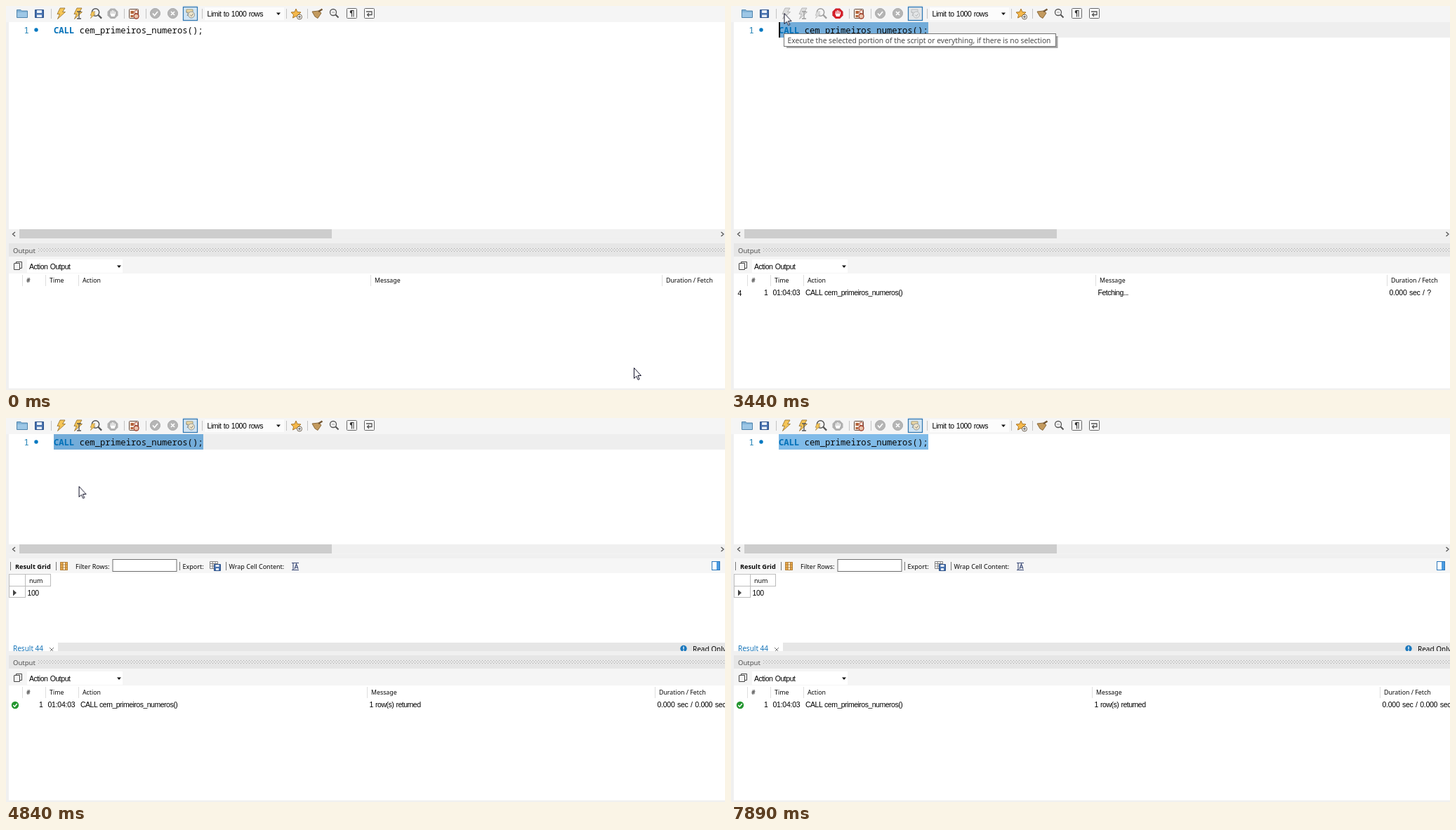
An HTML page that plays this animation: 1024 by 547 pixels, repeating every 8060 ms.

```html
<!DOCTYPE html>
<html lang="pt">
<head>
<meta charset="utf-8">
<title>SQL editor</title>
<style>
html, body { margin: 0; width: 100%; height: 100%; overflow: hidden; background: #fff; }
svg { display: block; width: 100vw; height: 100vh; }
text { font: 9px "Noto Sans", sans-serif; fill: #080808; white-space: pre; }
.code { font: 500 12.22px "Noto Sans Mono", monospace; }
.key { font-weight: 700; fill: #0070b8; }
.head { font-size: 8.8px; }
.ui { font: 10.5px "Liberation Sans", sans-serif; letter-spacing: -.45px; word-spacing: .8px; fill: #000; }
.row { letter-spacing: -.5px; }
.wide { letter-spacing: -.25px; }
.line { fill: none; stroke: #555; stroke-width: 1.3; }
.sep { stroke: #c3c3c3; }
.hot { fill: #c5e2f6; stroke: #3d8fce; }

/* 1% = 80.6 ms */
.anim { animation: 8.06s step-end infinite; }
#mouse { animation: mouse 8.06s ease-in-out infinite; }
#focus { animation-name: focus; }
#caret { animation-name: caret; }
#select { animation-name: select; }
#tip { animation-name: tip; }
#hot1 { animation-name: hot1; }
#hot2 { animation-name: hot2; }
.idle { animation-name: idle; }
.busy { animation-name: busy; }
.panel { animation-name: panel; }
.entry { animation-name: entry; }
.wait { animation-name: wait; }
.done { animation-name: done; }
#messageCol { animation-name: messageCol; }
#timeCol { animation-name: timeCol; }

@keyframes mouse {
  0%, .6% { transform: translate(894px, 515px); }
  10.546%, 11.3% { transform: translate(102px, 9px); }
  14.516%, 55.6% { transform: translate(75.5px, 10px); }
  65.012% { transform: translate(137px, 201px); }
  68.2% { transform: translate(138px, 241px); }
  69.851%, 71.2% { transform: translate(133px, 235px); }
  75.558%, 77.6% { transform: translate(84px, 234px); animation-timing-function: ease-in; }
  81.266% { transform: translate(380px, 200px); animation-timing-function: ease-out; }
  86.352%, 87.8% { transform: translate(922px, 490px); }
  93.176%, 100% { transform: translate(963px, 550px); }
}
@keyframes focus { 0% { opacity: 0; } 16.377% { opacity: 1; } 97.891%, 100% { opacity: 0; } }
@keyframes caret {
  0% { opacity: 0; transform: none; }
  16.377% { opacity: 1; transform: none; }
  23.077% { opacity: 0; transform: none; }
  28.908% { opacity: 1; transform: none; }
  34.739% { opacity: 0; transform: none; }
  35.856% { opacity: 1; transform: translateX(-212px); }
  49.256% { opacity: 1; transform: none; }
  55.831% { opacity: 0; transform: none; }
  62.407% { opacity: 1; transform: none; }
  68.983% { opacity: 0; transform: none; }
  75.558% { opacity: 1; transform: none; }
  82.134% { opacity: 0; transform: none; }
  88.586% { opacity: 1; transform: none; }
  95.037%, 100% { opacity: 0; transform: none; }
}
@keyframes select {
  0% { opacity: 0; fill: #73acd9; }
  35.856% { opacity: 1; fill: #73acd9; }
  97.891%, 100% { opacity: 1; fill: #80bbe8; }
}
@keyframes tip {
  0% { opacity: 0; } 18.61% { opacity: .35; } 19.417% { opacity: .7; }
  20.223% { opacity: 1; } 58.313%, 100% { opacity: 0; }
}
@keyframes hot1 {
  0% { opacity: 0; fill: #c5e2f6; }
  12.531% { opacity: 1; fill: #c5e2f6; }
  38.71% { opacity: 1; fill: #9bcdf0; }
  41.563% { opacity: 0; fill: #c5e2f6; }
  48.511% { opacity: 1; fill: #c5e2f6; }
  57.32%, 100% { opacity: 0; fill: #c5e2f6; }
}
@keyframes hot2 { 0% { opacity: 0; } 10.546% { opacity: 1; } 12.531%, 100% { opacity: 0; } }
@keyframes idle {
  0% { filter: none; } 41.563% { filter: grayscale(1) opacity(.55); } 48.511%, 100% { filter: none; }
}
@keyframes busy { 0% { opacity: 0; } 41.563% { opacity: 1; } 48.511%, 100% { opacity: 0; } }
@keyframes panel { 0% { opacity: 0; } 47.519%, 100% { opacity: 1; } }
@keyframes entry { 0% { opacity: 0; } 41.563%, 100% { opacity: 1; } }
@keyframes wait { 0% { opacity: 0; } 41.563% { opacity: 1; } 56.328%, 100% { opacity: 0; } }
@keyframes done { 0% { opacity: 0; } 56.328%, 100% { opacity: 1; } }
@keyframes messageCol { 0% { transform: none; } 56.328%, 100% { transform: translateX(-5px); } }
@keyframes timeCol { 0% { transform: none; } 56.328%, 100% { transform: translateX(-10px); } }
</style>
</head>
<body>
<svg viewBox="0 0 1024 547" preserveAspectRatio="none">
  <defs>
    <pattern id="dots" width="4" height="4" x="46" y="345" patternUnits="userSpaceOnUse">
      <path d="M0 0h1v1H0zM2 2h1v1H2z" fill="#a6a6a6"/>
    </pattern>
    <path id="bolt" d="M5 0H12L8.500 5.500H12.500L1.500 15.500 4.500 8.500H1Z" fill="#f6c657" stroke="#9b7734" stroke-width=".9"/>
    <path id="drop" d="M-3-1.500H3L0 2Z" fill="#111"/>
    <g id="lens" fill="none">
      <circle r="4.500" fill="#f4f4f4" stroke="#555" stroke-width="1.300"/>
      <path d="M3.300 3.300 7.500 7.500" stroke="#555" stroke-width="2"/>
    </g>
    <g id="scroll">
      <path d="M4 318H1024V331.500H4Z" fill="#f0f0f0"/>
      <path d="M19 318H464V331H19Z" fill="#cdcdcd"/>
      <path d="M13 322 9.500 325 13 328M1018.500 322 1022 325 1018.500 328" class="line"/>
    </g>
    <clipPath id="panelClip"><path d="M4 180H1024V332H4Z"/></clipPath>
  </defs>

  <!-- window -->
  <path d="M0 0H1024V547H0Z" fill="#f0f0f0"/>
  <path d="M0 0H1024V23H0Z" fill="#f5f5f5"/>
  <path d="M4 23H1024V318H4Z" fill="#fff"/>
  <use href="#scroll"/>

  <!-- toolbar -->
  <path class="sep" d="M64.500 4V18M168.500 4V18M199.500 4V18M279.500 4V18M399.500 4V18M429.500 4V18"/>
  <path d="M15.500 5.500H21L22.500 7H30.500V16.500H15.500Z" fill="#83b4d8" stroke="#4e83ac"/>
  <path d="M16 9H30V16H16Z" fill="#9dc7e6"/>
  <path d="M41.500 5.500H53.500V16.500H41.500Z" fill="#4771ae" stroke="#294e87"/>
  <path d="M44 6H51V10H44ZM44 12.500H51V16H44Z" fill="#e8eff8"/>
  <rect id="hot1" class="hot anim" x="68.500" y="1.500" width="20" height="19"/>
  <rect id="hot2" class="hot anim" x="93.500" y="1.500" width="20" height="19"/>
  <g class="idle anim">
    <use href="#bolt" x="72" y="3"/>
    <use href="#bolt" x="96" y="3"/>
    <path d="M101 8H107M104 8V18M101 18H107" class="line"/>
    <use href="#lens" transform="translate(127.500 9) scale(1.150)"/>
    <use href="#bolt" transform="translate(119.500 8) scale(.62)"/>
  </g>
  <path d="M149 3.500H155L159.500 8V13.500L155 18H149L144.500 13.500V8Z" fill="#b0b0b0"/>
  <path class="busy anim" d="M149 3.500H155L159.500 8V13.500L155 18H149L144.500 13.500V8Z" fill="#d5202a"/>
  <path d="M149.500 12V7.500M151.500 11V6M153.500 11V6.500M155.500 12V8" stroke="#fff" stroke-width="1.200"/>
  <path d="M148 10.500 150 15H154.500L156 11H149Z" fill="#fff"/>
  <rect x="175.500" y="4.500" width="13" height="13" rx="1" fill="#f5ece2" stroke="#674b3d"/>
  <path d="M177.500 7H182V11H177.500ZM177.500 13H181V16H177.500Z" fill="#b5643c"/>
  <circle cx="185.500" cy="8.500" r="2.500" fill="#f5ece2" stroke="#a3402c"/>
  <circle cx="185.500" cy="14.500" r="3.500" fill="#e9c3ac" stroke="#a3402c" stroke-width="1.300"/>
  <g fill="#b5b5b5" stroke="#a5a5a5">
    <circle cx="212.500" cy="10.500" r="7"/><circle cx="237.500" cy="10.500" r="7"/>
  </g>
  <path d="M209 10.500 211.500 13.500 216 8M235 8 240 13M240 8 235 13" fill="none" stroke="#fff" stroke-width="1.700"/>
  <rect x="252.500" y="1.500" width="20" height="19" fill="#e4e9ed" stroke="#2f79b4" stroke-width="1.300"/>
  <g class="idle anim">
    <path d="M254 3H271V19H254Z" fill="#cfe5f6"/>
    <path d="M257 5H266V9H257Z" fill="#eedbaa" stroke="#a89a70"/>
    <path d="M256.500 8 259.500 11 258 14" fill="none" stroke="#85827a"/>
    <circle cx="264" cy="12.500" r="4.500" fill="#eee5cc" stroke="#8b959d"/>
    <path d="M262 12.500 264 14.500 266.500 11" fill="none" stroke="#85827a"/>
  </g>
  <path d="M283 2H396V20H283Z" fill="#fcfcfc"/>
  <text class="ui" x="286.500" y="15">Limit to 1000 rows</text>
  <use href="#drop" x="388" y="11"/>
  <path d="M413 4 415 8.500 420 9 416.500 12.500 417.500 17 413 14.500 408.500 17 409.500 12.500 406 9 411 8.500Z" fill="#f5b84a" stroke="#a87529"/>
  <circle cx="418" cy="15.500" r="3.500" fill="#fff" stroke="#695c4a"/>
  <path d="M416 15.500H420M418 13.500V17.500" stroke="#555"/>
  <path d="M436 8 445 7 449 10 444 17.500 440 15Z" fill="#c39a5e" stroke="#88683b"/>
  <path d="M445 8 450.500 4.500" stroke="#735633" stroke-width="2.500"/>
  <use href="#lens" x="466" y="9"/>
  <path d="M464 9H468" stroke="#999"/>
  <g fill="#fafafa" stroke="#666">
    <rect x="485.500" y="3.500" width="14" height="14" rx="1"/><rect x="510.500" y="3.500" width="14" height="14" rx="1"/>
  </g>
  <path d="M495 6H491.500A2.300 2.300 0 0 0 491.500 10.500H492V15.500H493V7H494.500V15.500H495.500V6Z" fill="#333"/>
  <path d="M513 8H521V12.500H515M517 10 514.500 12.500 517 15" class="line"/>

  <!-- code line -->
  <path id="focus" class="anim" d="M68 23H1024V45H68Z" fill="#eee"/>
  <path id="select" class="anim" d="M68 23H281V45H68Z"/>
  <text class="code" x="25.500" y="38.500" style="fill:#2583b5">1</text>
  <circle cx="43" cy="34" r="2.700" fill="#0078c1"/>
  <text class="code" x="68" y="38.500"><tspan class="key">CALL</tspan> cem_primeiros_numeros();</text>
  <path id="caret" class="anim" d="M280 23H282V45H280Z" fill="#111"/>

  <!-- result grid -->
  <g class="panel anim" clip-path="url(#panelClip)">
    <path d="M4 180H1024V332H4Z" fill="#fff"/>
    <use href="#scroll" y="-138"/>
    <path d="M4 193.500H1024V201H4Z" fill="#f0f0f0"/>
    <path d="M4 200H1024V221H4Z" fill="#f6f6f6"/>
    <path d="M6.500 205V217M71.500 205V217M247.500 205V217M313.500 205V217" stroke="#777"/>
    <text x="13" y="214.500" style="font-size:9.2px;font-weight:700">Result Grid</text>
    <path d="M77 205H88V217H77Z" fill="#e9a94a"/>
    <path d="M81.500 206H84V216H81.500Z" fill="#fff3d9"/>
    <path d="M77.500 205.500H87.500V216.500H77.500ZM81 205V217M84.500 205V217M77 209H88M77 213H88" fill="none" stroke="#a8793b" stroke-width=".8"/>
    <text x="99" y="214.500">Filter Rows:</text>
    <rect x="152" y="201.500" width="91" height="17" fill="#fff" stroke="#707070"/>
    <text x="251.500" y="214.500">Export:</text>
    <path d="M290.500 204.500H301.500V214.500H290.500ZM290 207.500H302M290 211H302M294.500 204V215M298 204V215" fill="#fff" stroke="#848484"/>
    <path d="M296.500 208.500H305.500V217.500H296.500Z" fill="#4771ae" stroke="#294e87"/>
    <path d="M298.500 209H303.500V212H298.500ZM299 214H303V217H299Z" fill="#e8eff8"/>
    <text x="317.500" y="214.500">Wrap Cell Content:</text>
    <path d="M407 206.500H417M407 216.500H417M409 207V216M411 215 413.500 208 416 215M412 213H415" fill="none" stroke="#374775" stroke-width="1.100"/>
    <rect x="1005.500" y="204.500" width="11" height="12" fill="#fff" stroke="#2b78bd"/>
    <path d="M1012 205H1016V216H1012Z" fill="#4b9be0"/>

    <path d="M27 240H64V256H27Z" fill="#f0f0f0"/>
    <path class="done anim" d="M27 240H64V256H27Z" fill="#fff"/>
    <path d="M4.500 222V256M27.500 222V256M63.500 222V240M4 222.500H64M4 239.500H64M4 255.500H27" stroke="#bcbcbc" fill="none"/>
    <text x="33" y="234.500">num</text>
    <g class="done anim">
      <path d="M10 244.500 15 249 10 253.500Z" fill="#444"/>
      <text class="ui" x="30.500" y="252.500">100</text>
    </g>
    <path d="M74 320H1024V332H74Z" fill="#e6e6e6"/>
    <text x="10" y="332" style="font-size:10px;fill:#1574b8">Result 44</text>
    <path d="M62 327 68 333M68 327 62 333" stroke="#777"/>
    <circle cx="965" cy="328.500" r="4.700" fill="#1b78bd"/>
    <path d="M965 325.500V329.500M965 330.500V332" stroke="#fff" stroke-width="1.300"/>
    <text x="978" y="332.500" style="font-size:10px">Read Only</text>
  </g>

  <!-- output -->
  <path d="M4 338H1024V357H4Z" fill="#e6e6e6"/>
  <path d="M46 345H1024V351H46Z" fill="url(#dots)"/>
  <text x="10" y="351.500" style="font-size:9.500px;fill:#505050">Output</text>
  <path d="M4 357H1024V381H4Z" fill="#f5f5f5"/>
  <path d="M30 361H166V380H30Z" fill="#fff"/>
  <path d="M14.500 366V364.500H22.500V373.500H20M12 366.500H19.500V375.500H11.500V366.500" fill="none" stroke="#444"/>
  <text class="ui" x="33" y="374.500">Action Output</text>
  <use href="#drop" x="161" y="371"/>
  <path d="M4 381H1024V544.500H4Z" fill="#fff"/>
  <path d="M23.500 383V399M56.500 383V399M103.500 383V399" stroke="#dedede"/>
  <text class="head" x="29" y="394">#</text>
  <text class="head" x="62" y="394">Time</text>
  <text class="head" x="109" y="394">Action</text>
  <g class="entry anim">
    <text class="ui row" x="47" y="411.500">1</text>
    <text class="ui wide" x="59.500" y="411.500">01:04:03</text>
    <text class="ui row" x="106" y="411.500">CALL cem_primeiros_numeros()</text>
  </g>
  <text class="ui wait anim" x="9.500" y="412.500">4</text>
  <g class="done anim">
    <circle cx="13" cy="409" r="5.200" fill="#23962f"/>
    <path d="M10.300 409 12.300 411.200 15.800 407" fill="none" stroke="#fff" stroke-width="1.500"/>
  </g>
  <g id="messageCol" class="anim">
    <path d="M519.500 383V399" stroke="#dedede"/>
    <text class="head" x="525" y="394">Message</text>
    <text class="ui row wait anim" x="522.500" y="411.500">Fetching...</text>
    <text class="ui row done anim" x="522.500" y="411.500">1 row(s) returned</text>
  </g>
  <g id="timeCol" class="anim">
    <path d="M934.500 383V399" stroke="#dedede"/>
    <text class="head" x="940" y="394">Duration / Fetch</text>
    <text class="ui wide wait anim" x="937.500" y="411.500">0.000 sec / ?</text>
    <text class="ui wide done anim" x="937.500" y="411.500">0.000 sec / 0.000 sec</text>
  </g>

  <!-- tooltip -->
  <g id="tip" class="anim">
    <path d="M79 43H465.500V60H79Z" fill="#000" opacity=".35"/>
    <rect x="75.500" y="39.500" width="387" height="18" fill="#fff" stroke="#767676"/>
    <text x="80.500" y="52.500" style="font-size:10.25px;fill:#4a4a4a">Execute the selected portion of the script or everything, if there is no selection</text>
  </g>

  <path id="mouse" d="M.5.500V15.500L3.800 12.300 6.200 17.500 8.200 16.600 5.900 11.500H10.500Z" fill="#fff" stroke="#14142b"/>
</svg>
</body>
</html>
```
